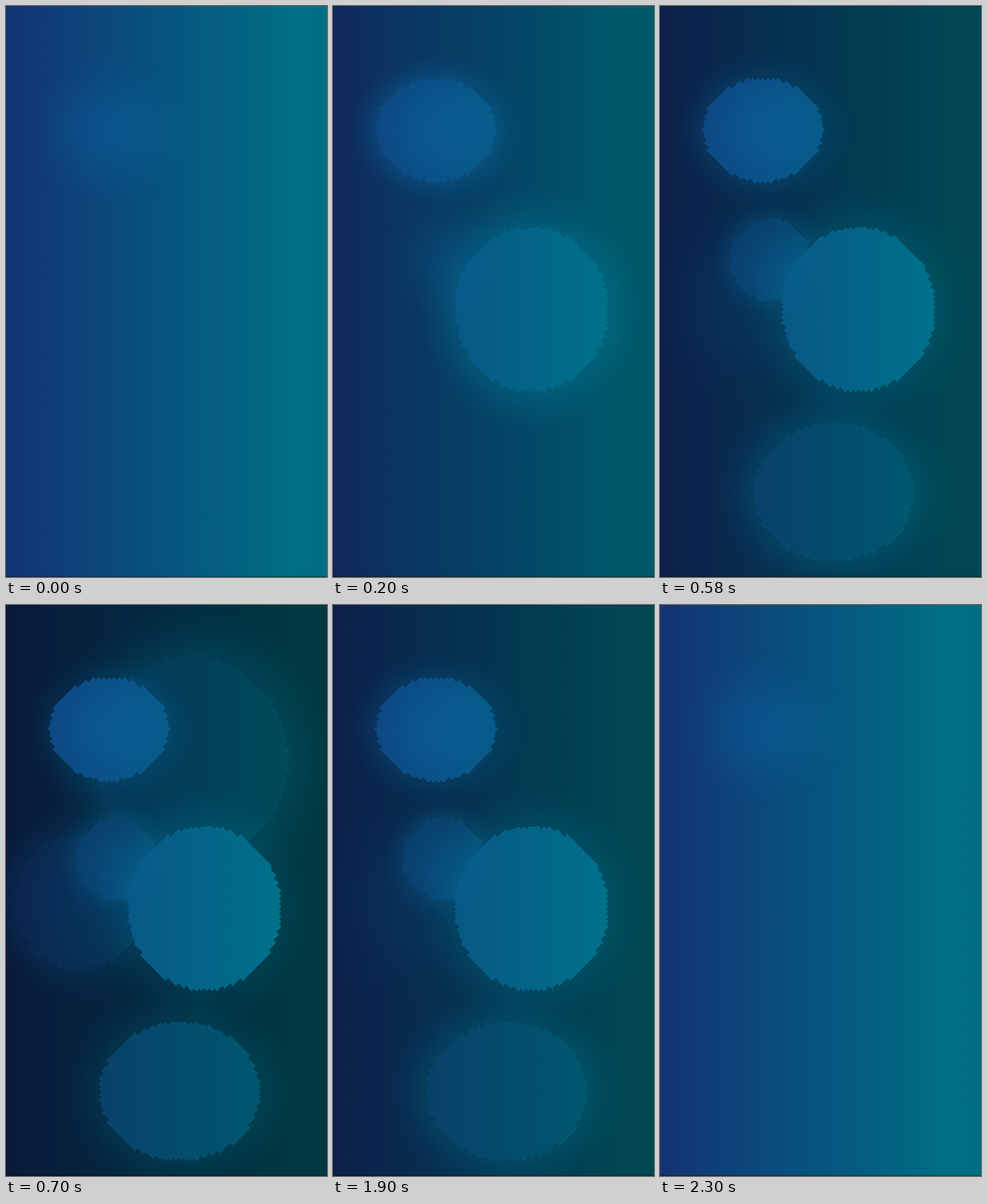
An HTML page that plays this animation: 561 by 998 pixels, repeating every 2.4 s.

```html
<!DOCTYPE html>
<html lang="en">
<head>
<meta charset="utf-8">
<title>Glowing orbs</title>
<style>
  html, body { margin: 0; width: 100%; height: 100%; overflow: hidden; background: #0a5080; }
  svg { display: block; width: 100%; height: 100%; }
  .layer { opacity: 0; animation: 2400ms step-end infinite; }
  .layer-0 { opacity: 1; }
  .layer-1 { animation-name: outer; }
  .layer-2 { animation-name: middle; }
  .layer-3 { animation-name: inner; }
  @keyframes outer  { 0%, 95.833% { opacity: 0 } 8.333%  { opacity: 1 } }
  @keyframes middle { 0%, 87.5%   { opacity: 0 } 16.666% { opacity: 1 } }
  @keyframes inner  { 0%, 79.166% { opacity: 0 } 29.166% { opacity: 1 } }
</style>
</head>
<body>
<svg id="stage" viewBox="0 0 561 998" preserveAspectRatio="none"></svg>
<script>
const BLUE = '#0a78b8', TEAL = '#0088a8';

// Each orb is spared by the dimming from layer `from` on.
// `soft` is its glow one layer earlier, `fill` the tint inside its edge.
const orbs = [
  { x: 180, y: 217, rx: 104, ry: 90,  color: BLUE, from: 1, soft: .25, fill: .13 },
  { x: 347, y: 530, rx: 134, ry: 143, color: TEAL, from: 1, soft: 0,   fill: .19 },
  { x: 194, y: 444, rx: 71,  ry: 72,  color: BLUE, from: 2, soft: .15, fill: .07 },
  { x: 304, y: 850, rx: 140, ry: 121, color: TEAL, from: 2, soft: 0,   fill: .11 },
  { x: 128, y: 520, rx: 113, ry: 117, color: BLUE, from: 3, soft: .09, fill: .03 },
  { x: 323, y: 270, rx: 169, ry: 182, color: TEAL, from: 3, soft: 0,   fill: .09 }
];
const HALO = 1.48, TOOTH = 9;
const FULL = 'width="561" height="998"';
let defs = '', body = '';

// Ellipse outline snapped to a diagonal lattice, which gives the toothed rim.
function rim({ x, y, rx, ry }) {
  const snap = v => Math.round(v / TOOTH) * TOOTH;
  const points = [];
  for (let i = 0; i < 720; i++) {
    const a = i * Math.PI / 360;
    const px = x + rx * Math.cos(a), py = y + ry * Math.sin(a);
    const u = snap(px + py), v = snap(px - py);
    const point = `${(u + v) / 2},${(u - v) / 2}`;
    if (point !== points[points.length - 1]) points.push(point);
  }
  return `<polygon points="${points.join(' ')}"/>`;
}

function glow(id, orb, stops) {
  const marks = stops.map(([at, alpha]) =>
    `<stop offset="${at}" stop-color="${orb.color}" stop-opacity="${alpha}"/>`).join('');
  defs += `<radialGradient id="${id}">${marks}</radialGradient>`;
  return `<ellipse cx="${orb.x}" cy="${orb.y}" rx="${orb.rx * HALO}" ry="${orb.ry * HALO}" fill="url(#${id})"/>`;
}

const softGlow = (orb, id) => glow(id, orb,
  [[0, orb.soft], [.35, orb.soft * .75], [.7, orb.soft * .25], [1, 0]]);

const rimGlow = (orb, id) => glow(id, orb,
  [[0, orb.fill], [.66, orb.fill], [.69, orb.fill + .07], [.85, orb.fill * .4 + .02], [1, 0]]);

const base = [[0, '#143373'], [.24, '#0d447a'], [.46, '#08527f'],
              [.68, '#036081'], [.88, '#006e83'], [1, '#006e82']];
defs += '<linearGradient id="base">' + base.map(([at, color]) =>
  `<stop offset="${at}" stop-color="${color}"/>`).join('') + '</linearGradient>';

for (let level = 0; level < 4; level++) {
  const spared = orbs.filter(orb => orb.from <= level);
  defs += `<mask id="around${level}" maskUnits="userSpaceOnUse" x="0" y="0" ${FULL}>` +
    `<rect ${FULL} fill="#fff"/>${spared.map(rim).join('')}</mask>`;

  const ground = level
    ? `<rect ${FULL} fill="#000" fill-opacity=".2" mask="url(#around${level})"/>`
    : `<rect ${FULL} fill="url(#base)"/>`;
  const glows = orbs.map((orb, i) => {
    if (orb.from === level) return rimGlow(orb, `rim${i}`);
    return orb.from === level + 1 && orb.soft ? softGlow(orb, `soft${i}`) : '';
  }).join('');
  body += `<g class="layer layer-${level}">${ground}` +
    `<g mask="url(#around${Math.max(0, level - 1)})">${glows}</g></g>`;
}

body += '<rect y="996" width="561" height="2" fill-opacity=".25"/>';
document.getElementById('stage').innerHTML = `<defs>${defs}</defs>${body}`;
</script>
</body>
</html>
```
